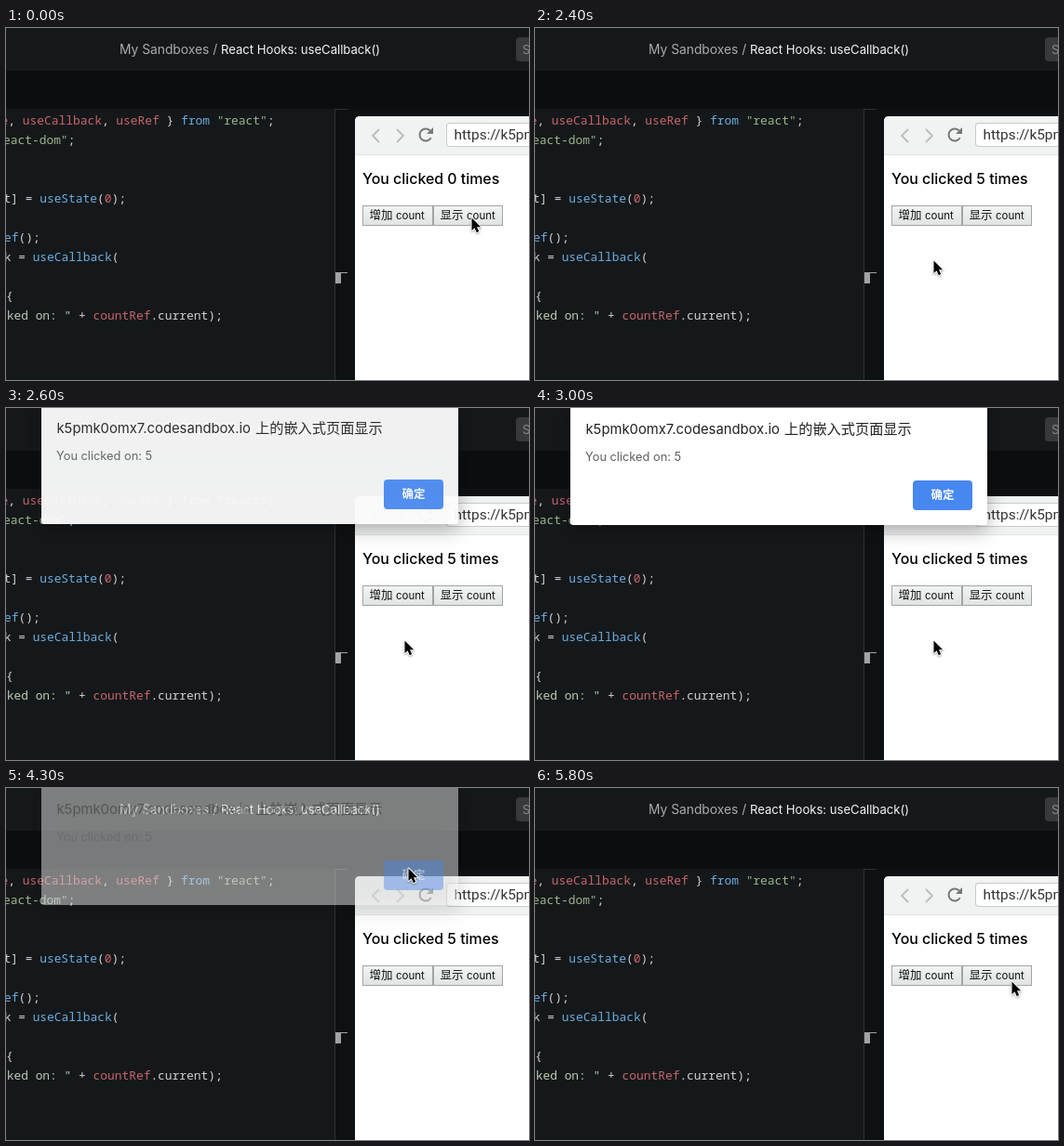
Write an HTML page with a canvas that moves like this. It is 562 px wide and 379 px high and loops after 6000 ms.

```html
<!DOCTYPE html>
<html lang="zh-CN">
<head>
<meta charset="utf-8">
<title>useCallback</title>
<style>
html, body { margin: 0; width: 100%; height: 100%; overflow: hidden; background: #15181a; }
canvas { display: block; width: 562px; height: 379px; }
</style>
</head>
<body>
<canvas id="stage" width="562" height="379"></canvas>
<script>
const ctx = document.getElementById('stage').getContext('2d');
const LOOP = 6000, STEP = 100;

const UI = 'Inter, "Noto Sans", sans-serif';
const CJK = '"Noto Sans CJK SC", "Noto Sans CJK", sans-serif';
const MONO = '"Noto Sans Mono", "DejaVu Sans Mono", monospace';
const RED = '#c8656c', BLUE = '#6aaee0', GREEN = '#9ab68c', PLAIN = '#d0d3d6', PALE = '#bccbb4';

// Each line: x, baseline, then colour and text pairs
const CODE = [
  [-5.4, 103.5, RED, 'e', PLAIN, ', ', RED, 'useCallback', PLAIN, ', ', RED, 'useRef',
    PLAIN, ' } ', BLUE, 'from ', GREEN, '"react"', PLAIN, ';'],
  [-3, 124.5, GREEN, 'eact-dom"', PLAIN, ';'],
  [-2.5, 187.5, PLAIN, 't] = ', BLUE, 'useState', PLAIN, '(', RED, '0', PLAIN, ');'],
  [-2, 229.5, BLUE, 'ef', PLAIN, '();'],
  [-2.3, 250.5, PLAIN, 'k = ', BLUE, 'useCallback', PLAIN, '('],
  [0, 292.5, PLAIN, '{'],
  [0.7, 313.5, PALE, 'ked on: "', PLAIN, ' + ', RED, 'countRef', PLAIN, '.current);']
];

const CLICKS = [1200, 1400, 1700, 1900, 2100];

// Cursor moves: start, end, from, control, to
const MOVES = [
  [100, 800, [500, 204], [466, 261], [422, 207]],
  [2200, 2400, [422, 207], [425, 229], [428, 250]],
  [3200, 3700, [428, 250], [430, 168], [432, 86]],
  [4700, 5400, [432, 86], [470, 130], [511, 196]],
  [5400, 5500, [511, 196], [512, 202], [512, 208]]
];

function text(str, x, y, size, family, color, weight = 400) {
  ctx.font = `${weight} ${size}px ${family}`;
  ctx.fillStyle = color;
  ctx.fillText(str, x, y);
  return ctx.measureText(str).width;
}

function rect(x, y, w, h, color) {
  ctx.fillStyle = color;
  ctx.fillRect(x, y, w, h);
}

function round(x, y, w, h, r, color) {
  ctx.beginPath();
  ctx.roundRect(x, y, w, h, r);
  ctx.fillStyle = color;
  ctx.fill();
}

function stroke(points, color, width) {
  ctx.beginPath();
  points.forEach(([x, y]) => ctx.lineTo(x, y));
  ctx.strokeStyle = color;
  ctx.lineWidth = width;
  ctx.stroke();
}

function drawEditor() {
  rect(0, 0, 562, 379, '#15181a');
  rect(0, 46, 562, 41, '#0b0e10');
  rect(354, 87, 208, 292, '#0e1113');
  rect(353, 87, 1, 292, '#303236');
  rect(353, 87, 14, 1, '#303236');

  text('My Sandboxes /', 122, 28, 13.8, UI, '#a9abad');
  text('React Hooks: useCallback()', 231, 28, 13.1, UI, '#f4f4f4');
  round(548, 10, 30, 26, 4, '#37393c');
  text('S', 555, 28, 13, UI, '#85878a');

  for (const [left, y, ...runs] of CODE) {
    let x = left;
    for (let i = 0; i < runs.length; i += 2) x += text(runs[i + 1], x, y, 12.9, MONO, runs[i]);
  }
  rect(354, 263, 6, 12, '#a2a3a4');
  rect(360, 263, 7, 1, '#a2a3a4');
}

function drawButton(x, w, label) {
  const fill = ctx.createLinearGradient(0, 191, 0, 213);
  fill.addColorStop(0, '#f3f4f4');
  fill.addColorStop(1, '#e0e3e3');
  rect(x, 191, w, 22, fill);
  ctx.strokeStyle = '#a3a5a5';
  ctx.lineWidth = 1;
  ctx.strokeRect(x + 0.5, 191.5, w - 1, 21);
  text(label, x + 7.5, 206, 12.5, CJK, '#111');
  text('count', x + 36, 206, 11.5, UI, '#111');
}

function drawReload() {
  ctx.beginPath();
  ctx.arc(451, 115, 6.5, 0.5, 5.5);
  ctx.strokeStyle = '#777';
  ctx.lineWidth = 2;
  ctx.stroke();
  ctx.beginPath();
  ctx.moveTo(459, 107);
  ctx.lineTo(459, 114);
  ctx.lineTo(452, 114);
  ctx.fillStyle = '#777';
  ctx.fill();
}

function drawBrowser(count) {
  round(375, 95, 200, 300, [5, 0, 0, 0], '#fff');
  round(375, 95, 200, 41, [5, 0, 0, 0], '#f1f2f2');
  rect(375, 136, 187, 1, '#e4e5e5');
  stroke([[401, 109], [394, 116], [401, 123]], '#bbb', 1.8);
  stroke([[420, 109], [427, 116], [420, 123]], '#bbb', 1.8);
  drawReload();
  round(473, 102, 120, 26, 4, '#c9caca');
  round(474, 103, 120, 24, 3, '#fff');
  text('https://k5pmk0omx7.codesandbox.io', 481.5, 120, 15.4, 'Roboto, sans-serif', '#333');

  text(`You clicked ${count} times`, 383, 168, 15.9, UI, '#000', 500);
  drawButton(383, 76, '增加');
  drawButton(459, 75, '显示');
}

function drawDialog(alpha, dy, hover) {
  ctx.save();
  ctx.globalAlpha = alpha;
  ctx.translate(0, dy);
  ctx.save();
  ctx.shadowColor = 'rgba(0,0,0,.32)';
  ctx.shadowBlur = 20;
  ctx.shadowOffsetY = 5;
  round(38, -10, 448, 136, 3, '#fff');
  ctx.restore();
  text('k5pmk0omx7.codesandbox.io', 54.5, 28, 14.8, UI, '#202124');
  text('上的嵌入式页面显示', 268, 28, 15.2, CJK, '#202124');
  text('You clicked on: 5', 54, 57, 12.8, UI, '#5c5f63');
  round(406, 78, 64, 32, 4, hover ? '#4a86e8' : '#4787f0');
  text('确定', 425.5, 98, 12.5, CJK, '#fff', 700);
  ctx.restore();
}

function dialogState(t) {
  if (t < 2500 || t >= 4400) return null;
  if (t < 2600) return [0.5, -3];
  if (t < 2700) return [0.94, -1];
  return [t < 4300 ? 1 : 0.45, 0];
}

function cursorAt(t) {
  let pos = MOVES[0][2];
  for (const [start, end, a, c, b] of MOVES) {
    if (t <= start) break;
    const p = Math.min(1, (t - start) / (end - start));
    const e = p * p * (3 - 2 * p), q = 1 - e;
    pos = a.map((v, i) => q * q * v + 2 * q * e * c[i] + e * e * b[i]);
  }
  return pos;
}

function drawCursor([x, y]) {
  ctx.save();
  ctx.translate(Math.round(x), Math.round(y));
  ctx.beginPath();
  [[0.5, 0.5], [0.5, 14], [3.6, 11.2], [5.8, 16.2], [8.2, 15.1], [6, 10.3], [10.2, 10.2]]
    .forEach(([px, py]) => ctx.lineTo(px, py));
  ctx.closePath();
  ctx.lineJoin = 'round';
  ctx.shadowColor = 'rgba(0,0,0,.35)';
  ctx.shadowBlur = 2;
  ctx.shadowOffsetY = 1;
  ctx.strokeStyle = '#fff';
  ctx.lineWidth = 2;
  ctx.stroke();
  ctx.shadowColor = 'transparent';
  ctx.fillStyle = '#000';
  ctx.fill();
  ctx.restore();
}

function draw(now) {
  const t = Math.floor((now % LOOP) / STEP) * STEP;
  drawEditor();
  drawBrowser(CLICKS.filter(c => t >= c).length);
  const dialog = dialogState(t);
  if (dialog) drawDialog(...dialog, t >= 3600);
  drawCursor(cursorAt(t));
}

const begin = performance.now();
function tick() {
  draw(performance.now() - begin);
  requestAnimationFrame(tick);
}
tick();
</script>
</body>
</html>
```
